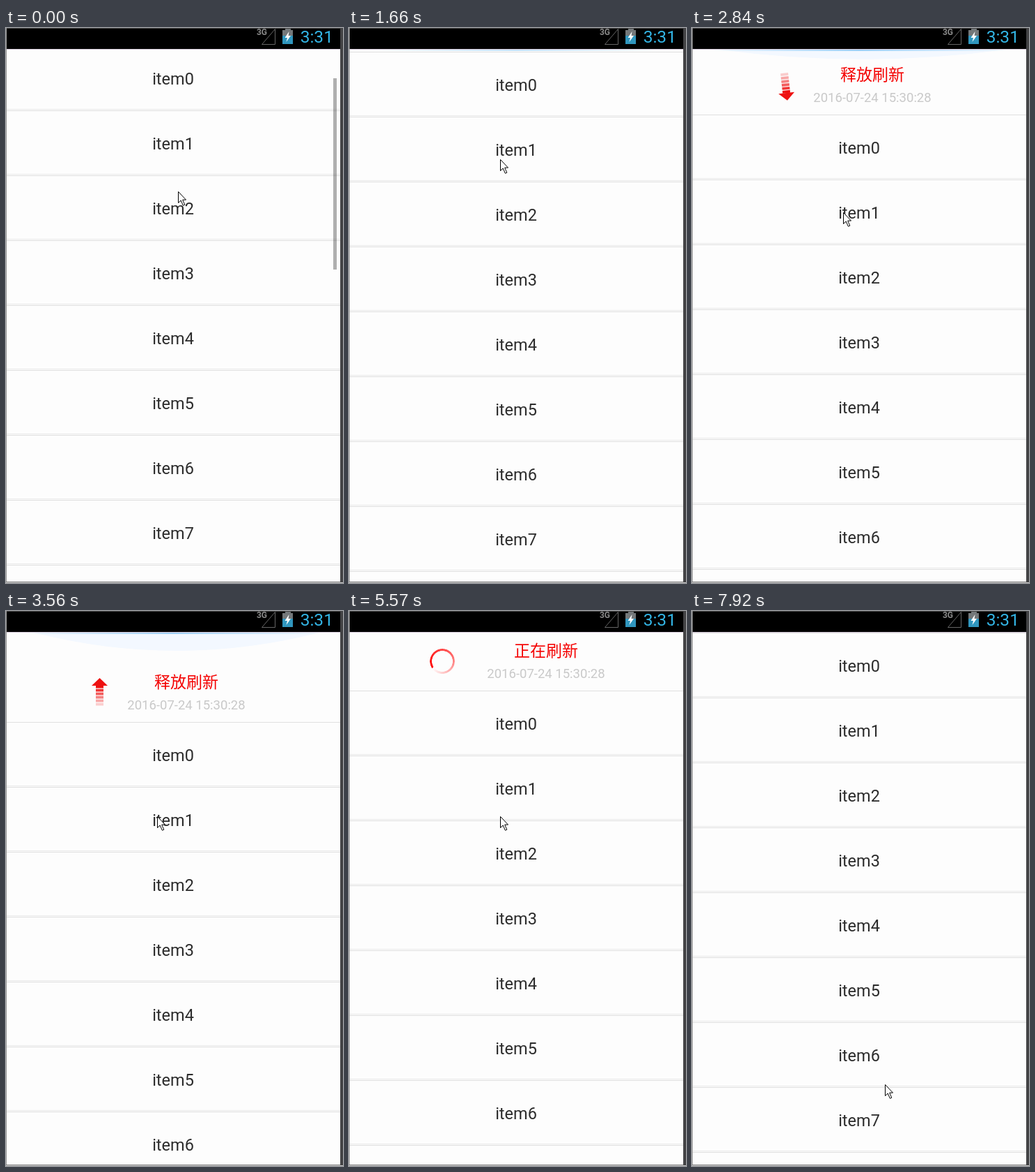
Write an HTML page that moves like this. It is 484 px wide and 795 px high and loops after 8000 ms.

```html
<!DOCTYPE html>
<html lang="zh">
<head>
<meta charset="utf-8">
<title>Pull to refresh</title>
<style>
html, body { margin: 0; width: 100%; height: 100%; overflow: hidden; background: #fdfdfd; }
svg { position: absolute; left: 0; top: 0; display: block; }
text { font-family: Roboto, sans-serif; text-anchor: middle; }
#rows text { font-size: 23.5px; fill: #2c2c2c; }
#title { font: 23px "Noto Sans CJK SC", "Noto Sans CJK", sans-serif; fill: #f40000; }
#date { font-size: 18.5px; fill: #c9c9c9; }
#ring {
  position: absolute; left: 116px; top: 54px; width: 36px; height: 36px; border-radius: 50%;
  background: conic-gradient(from 90deg, #f00, #f66 50%, #fff);
  -webkit-mask: radial-gradient(circle, transparent 14.6px, #000 15.2px);
  mask: radial-gradient(circle, transparent 14.6px, #000 15.2px);
}
</style>
</head>
<body>
<svg width="484" height="795" viewBox="0 0 484 795">
  <defs>
    <linearGradient id="edge">
      <stop offset="0.05" stop-color="#9ccff5" stop-opacity="0"/>
      <stop offset="0.5" stop-color="#9ccff5"/>
      <stop offset="0.95" stop-color="#9ccff5" stop-opacity="0"/>
    </linearGradient>
  </defs>
  <rect width="484" height="795" fill="#fdfdfd"/>
  <path id="glow" fill="#f3f8ff"/>
  <rect id="line" x="1" y="31" width="479" height="2" fill="url(#edge)"/>

  <!-- y = 0 is the middle of the first row's label -->
  <g id="list">
    <g id="header">
      <text id="title" x="259" y="-97"></text>
      <text id="date" x="259" y="-66">2016-07-24 15:30:28</text>
    </g>
    <g id="arrow" fill="#ee1111"><path d="M-11.5 10.5H11.5L0 21.5Z"/></g>
    <g id="rows"></g>
  </g>

  <rect id="bar" x="470" y="72" width="5" height="274" fill="#000" fill-opacity="0.31"/>

  <rect width="480" height="30"/>
  <rect x="1" y="30" width="479" height="1" fill="#d9cddd"/>
  <text x="367.5" y="10" font-size="12" font-weight="700" fill="#8a8a8a">3G</text>
  <path d="M386.5 1.5V23.5H367.5Z" fill="none" stroke="#666"/>
  <path d="M401 0h8v3h3v9h-15v-9h4z" fill="#74787a"/>
  <path d="M397 11h15v12h-15z" fill="#3096be"/>
  <path d="M406.5 5L400.5 14H404L402.5 20L409 11H405.5Z" fill="#fff"/>
  <text x="446.3" y="21" font-size="24.5" fill="#33b5e5">3:31</text>

  <rect width="480" height="1" fill="#444"/>
  <rect width="1" height="795" fill="#999"/>
  <rect y="793" width="484" height="1" fill="#777"/>
  <rect y="794" width="484" height="1" fill="#d0d0d0"/>
  <rect x="480" width="4" height="794" fill="#434345"/>
  <path id="mouse" d="M.5 .5V16.5L4.2 13L7.4 20.2L9.8 19.2L6.7 12.1H11.5Z" fill="#fff" stroke="#000"/>
</svg>
<div id="ring"></div>
<script>
const LOOP = 8000, STEP = 120, PHASE = 80;
const REST = 79, HEADER = 83, ROW = 93;
const RELEASE = 3850, DONE = 6930, TURN = 2780;
const $ = id => document.getElementById(id);

function add(parent, tag, attrs, text = '') {
  const el = document.createElementNS('http://www.w3.org/2000/svg', tag);
  for (const k in attrs) el.setAttribute(k, attrs[k]);
  el.textContent = text;
  return parent.appendChild(el);
}

const rule = (y, fill) => add($('rows'), 'rect', { x: 1, y, width: 479, height: 1, fill });
rule(-48, '#e0e0e0');
for (let i = 0; i < 9; i++) {
  add($('rows'), 'text', { x: 240, y: i * ROW + 8 }, 'item' + i);
  rule(i * ROW + 43, '#e9e9e9');
  rule(i * ROW + 45, '#dfdfdf');
}
for (let i = 0; i < 6; i++) {
  add($('arrow'), 'rect', { x: -5.5, y: 7 - i * 5, width: 11, height: 3.8, opacity: 1 - i * 0.16 });
}

// Progress from 0 to 1 between two times
const ramp = (t, a, b) => Math.min(1, Math.max(0, (t - a) / (b - a)));

// The drag: time, list y, pointer y
const drag = [[1530, REST, 184], [1640, 82, 188], [2120, 129, 220], [2840, 172, 264], [3560, 207, 294]];

function along(t, k) {
  return drag.slice(1).reduce(
    (v, p, i) => v + (p[k] - drag[i][k]) * ramp(t, drag[i][0], p[0]), drag[0][k]);
}

function listY(t) {
  if (t < 560) return 73 + 15 * ramp(t, 0, 420);
  if (t < RELEASE) return along(t, 1);
  return t < DONE ? REST + HEADER : REST;
}

function pointer(t) {
  const rise = ramp(t, 600, 1150), leave = ramp(t, 6280, 7300), nudge = ramp(t, 7760, 7880);
  return [
    247 - 30 * rise + 57 * leave + 3 * nudge,
    234 + 15 * ramp(t, 0, 420) - 65 * rise + along(t, 2) - drag[0][2] + 401 * leave - 17 * nudge
  ];
}

const move = (id, x, y, more = '') =>
  $(id).setAttribute('transform', `translate(${x} ${y}) ${more}`);

function draw(now) {
  const t = Math.max(0, PHASE + Math.floor((now % LOOP - PHASE) / STEP) * STEP);
  const busy = t >= RELEASE && t < DONE;
  const y = Math.round(listY(t));
  move('list', 0, y);
  move('header', busy ? 24 : 0, 0);
  $('title').textContent = busy ? '正在刷新' : y > REST + HEADER ? '释放刷新' : '下拉刷新';

  const spin = -90 * (1 - Math.cos(Math.PI * ramp(t, TURN, TURN + 500)));
  move('arrow', 134.5, -89.5, `rotate(${spin})`);
  $('arrow').style.display = busy ? 'none' : '';
  $('ring').style.display = busy ? '' : 'none';
  $('ring').style.transform = `rotate(${(t - RELEASE) * 0.09}deg)`;

  // The edge glow grows with the pull and fades after release
  const stretch = Math.max(0, listY(Math.min(t, RELEASE - 1)) - REST) / 128;
  const fade = 1 - ramp(t, RELEASE, RELEASE + 500);
  const depth = 26 * stretch ** 2 * fade;
  $('glow').setAttribute('d', `M40 31Q245 ${31 + 2 * depth} 450 31Z`);
  $('line').setAttribute('opacity', Math.min(1, stretch * 25) * fade);

  $('bar').setAttribute('opacity', 1 - ramp(t, 500, 900));
  move('mouse', ...pointer(t).map(Math.round));
}

const begin = performance.now();
function tick() {
  draw(performance.now() - begin);
  requestAnimationFrame(tick);
}
tick();
</script>
</body>
</html>
```
